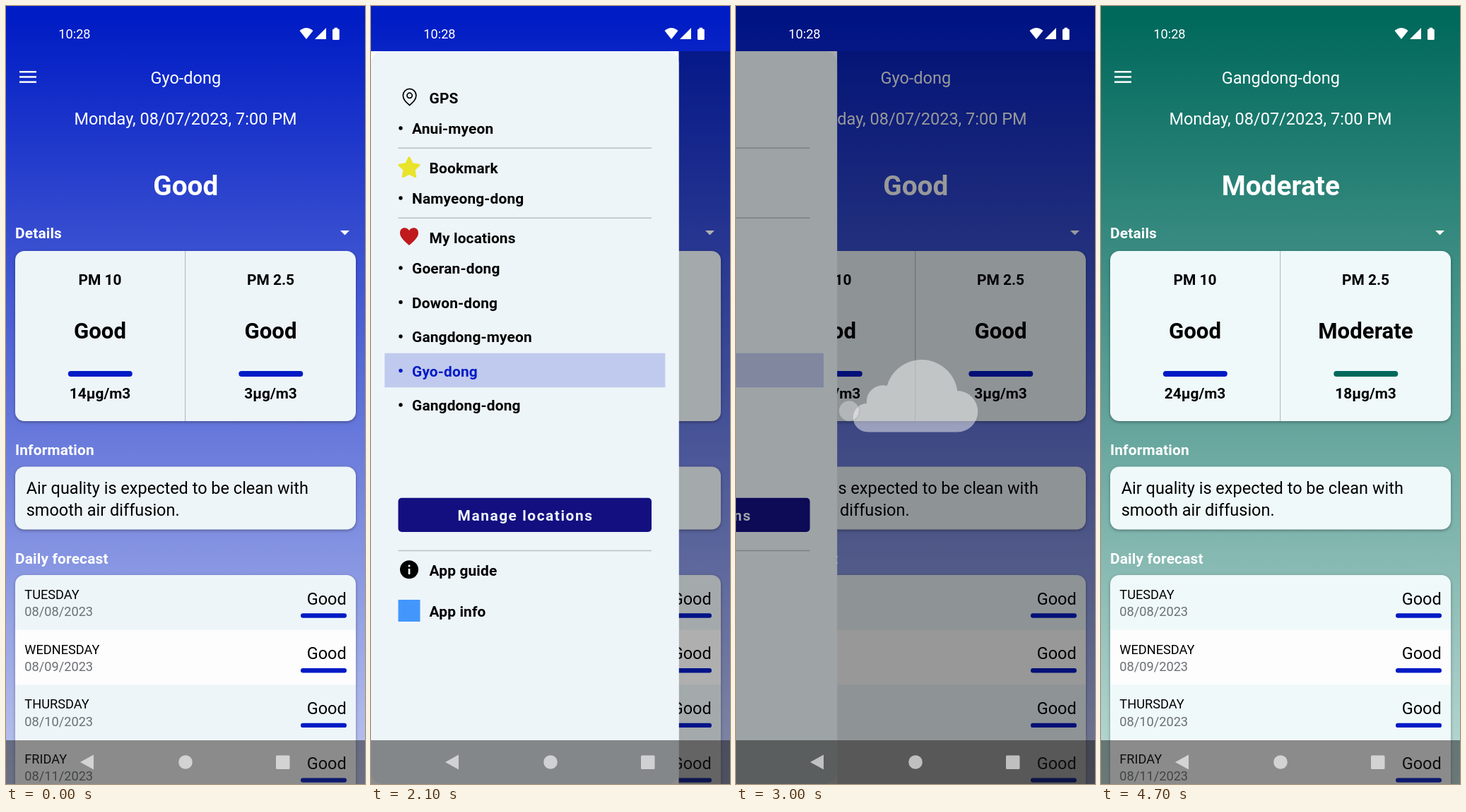
Animation, 508 px wide and 1102 px high, one loop 4800 ms. Source, as an HTML page with a canvas:

```html
<!DOCTYPE html>
<html lang="en">
<head>
<meta charset="utf-8">
<title>Air quality app</title>
<style>
  html, body { margin: 0; width: 100%; height: 100%; overflow: hidden; background: #001cc4; }
  canvas { display: block; }
</style>
</head>
<body>
<canvas id="stage" width="508" height="1102"></canvas>
<script>
const W = 508, H = 1102, LOOP = 4800, STEP = 100;
const STATUS_H = 64, NAV_Y = 1040, DRAWER_W = 435.5;
const BLUE = '#001bc5', TEAL = '#00695c';
const ctx = document.getElementById('stage').getContext('2d');

const PLACES = {
  gyo: {
    name: 'Gyo-dong', level: 'Good', top: '#001cc4', bottom: '#bec7ee', card: '#edf5f9',
    pm: [['PM 10', 'Good', BLUE, '14µg/m3'], ['PM 2.5', 'Good', BLUE, '3µg/m3']]
  },
  gangdong: {
    name: 'Gangdong-dong', level: 'Moderate', top: TEAL, bottom: '#bddad5', card: '#eff9f9',
    pm: [['PM 10', 'Good', BLUE, '24µg/m3'], ['PM 2.5', 'Moderate', TEAL, '18µg/m3']]
  }
};
const DAYS = ['TUESDAY', 'WEDNESDAY', 'THURSDAY', 'FRIDAY'];

const clamp = v => Math.min(1, Math.max(0, v));
const ramp = (t, from, to) => clamp((t - from) / (to - from));

// Critically damped spring from 0 to 1, snapping at rest.
function spring(ms) {
  if (ms <= 0) return 0;
  const x = ms * 0.0231;
  const v = 1 - (1 + x) * Math.exp(-x);
  return v > 0.985 ? 1 : v;
}

function text(str, x, y, size, { color = '#000', bold = false, align = 'left', spacing = 0 } = {}) {
  ctx.font = `${bold ? 700 : 400} ${size}px Roboto, sans-serif`;
  ctx.fillStyle = color;
  ctx.textAlign = align;
  ctx.letterSpacing = spacing + 'px';
  ctx.fillText(str, x, y);
}

function rect(x, y, w, h, color, radius = 0) {
  ctx.fillStyle = color;
  ctx.beginPath();
  ctx.roundRect(x, y, w, h, radius);
  ctx.fill();
}

function circle(x, y, r, color) {
  ctx.fillStyle = color;
  ctx.beginPath();
  ctx.arc(x, y, r, 0, 7);
  ctx.fill();
}

function shape(d, color) {
  ctx.fillStyle = color;
  ctx.fill(new Path2D(d));
}

function card(y, h, color) {
  ctx.save();
  ctx.shadowColor = 'rgba(0,0,0,.35)';
  ctx.shadowBlur = 4;
  ctx.shadowOffsetY = 1.5;
  rect(13, y, 482, h, color, 13);
  ctx.restore();
}

const heading = (str, y) => text(str, 13, y, 20.9, { color: '#fff', bold: true, spacing: 0.15 });

function drawHome(place) {
  const sky = ctx.createLinearGradient(0, 0, 0, H);
  sky.addColorStop(0.015, place.top);
  sky.addColorStop(1, place.bottom);
  rect(0, 0, W, H, sky);

  for (const y of [92, 99.2, 106.4]) rect(19, y, 24, 2.5, '#fff');
  const white = { color: '#fff', align: 'center' };
  text(place.name, 254.3, 109.5, 23.5, white);
  text('Monday, 08/07/2023, 7:00 PM', 254, 168, 23.5, white);
  text(place.level, 254.3, 268, 38.8, { ...white, bold: true });

  heading('Details', 329);
  shape('M473 318h13l-6.5 6.5z', '#fff');
  card(347, 241, place.card);
  rect(253, 347, 1.2, 241, '#b9bec1');
  place.pm.forEach(([label, level, color, amount], i) => {
    const x = 133 + i * 241.5, centered = { bold: true, align: 'center' };
    text(label, x, 394.5, 20.9, centered);
    text(level, x, 471, 31.2, centered);
    rect(x - 45.2, 517, 91, 8, color, 4);
    text(amount, x, 556, 20.9, centered);
  });

  heading('Information', 636);
  card(652.5, 89, place.card);
  text('Air quality is expected to be clean with', 28.7, 690.5, 23.5);
  text('smooth air diffusion.', 28.7, 721.5, 23.5);

  heading('Daily forecast', 790);
  card(806, 330, place.card);
  DAYS.forEach((day, i) => {
    const y = 806 + i * 77.7;
    if (i % 2) rect(13, y, 482, 77.7, '#fdfdfe');
    text(day, 26.3, y + 34, 18.2);
    text(`08/${String(8 + i).padStart(2, '0')}/2023`, 26.3, y + 58.3, 18.2, { color: '#6b7074' });
    text('Good', 481.7, y + 41.5, 23.5, { align: 'right' });
    rect(417, y + 54.3, 65, 6.4, BLUE, 3.2);
  });
}

function drawStar(cx, cy, r) {
  ctx.beginPath();
  for (let i = 0; i < 10; i++) {
    const a = i * Math.PI / 5 - Math.PI / 2, d = i % 2 ? r * 0.5 : r;
    ctx.lineTo(cx + d * Math.cos(a), cy + d * Math.sin(a));
  }
  ctx.closePath();
  ctx.fillStyle = ctx.strokeStyle = '#e9e32b';
  ctx.lineWidth = 3;
  ctx.lineJoin = 'round';
  ctx.fill();
  ctx.stroke();
}

function drawPin() {
  ctx.strokeStyle = '#000';
  ctx.lineWidth = 1.7;
  ctx.stroke(new Path2D('M54.6 140.5C50 136.500 45.300 132.500 45.300 126.700A9.300 9.300 0 0 1 63.900 126.700C63.900 132.500 59.200 136.500 54.600 140.500Z'));
  ctx.beginPath();
  ctx.arc(54.6, 126.8, 3.6, 0, 7);
  ctx.stroke();
}

function drawDrawer(open) {
  rect(0, STATUS_H, W, H - STATUS_H, `rgba(0,0,0,${0.31 * open})`);
  ctx.save();
  ctx.translate(DRAWER_W * (open - 1), 0);
  rect(0, STATUS_H, DRAWER_W, H - STATUS_H, '#fff');
  rect(0, STATUS_H, DRAWER_W, H - STATUS_H, '#edf5f9', 17);

  const label = (str, x, y, color) => text(str, x, y, 20.9, { bold: true, spacing: 0.15, color });
  const title = (str, y) => label(str, 82.5, y);
  const item = (str, y, color = '#000') => {
    circle(42, y - 8, 2.7, color);
    label(str, 58, y, color);
  };
  for (const y of [200.5, 299.5, 770.8]) rect(38.5, y, 358.5, 1.4, '#b9bfc2');

  drawPin();
  title('GPS', 137.5);
  item('Anui-myeon', 181);
  drawStar(54, 229.7, 14.8);
  title('Bookmark', 236.5);
  item('Namyeong-dong', 280);
  shape('M54 339C45 331 41 327 41 321.500C41 313.500 50 312 54 318C58 312 67 313.500 67 321.500C67 327 63 331 54 339Z', '#c01a1c');
  title('My locations', 335.5);
  rect(19.3, 491.700, 397, 48.5, '#c0caee');
  ['Goeran-dong', 'Dowon-dong', 'Gangdong-myeon', 'Gyo-dong', 'Gangdong-dong'].forEach(
    (name, i) => item(name, 379 + i * 48.5, i === 3 ? BLUE : '#000'));

  rect(38.5, 696.7, 358.5, 48.3, '#130f80', 5);
  text('Manage locations', 218.5, 729, 20.9, { color: '#edf5f9', bold: true, align: 'center', spacing: 1.55 });

  circle(54, 798.3, 13, '#000');
  rect(52.7, 797, 2.7, 8, '#edf5f9');
  rect(52.7, 791.7, 2.7, 2.7, '#edf5f9');
  title('App guide', 807);
  rect(38.5, 841, 31, 31, '#4397fc');
  title('App info', 865);
  ctx.restore();
}

function drawCloud(alpha) {
  ctx.save();
  ctx.globalAlpha = alpha;
  const cloud = new Path2D();
  for (const [x, y, r] of [[186, 583, 20.3], [208, 560.5, 23.3], [262.7, 552, 51], [313, 574.3, 29.2]]) {
    cloud.moveTo(x + r, y);
    cloud.arc(x, y, r, 0, 2 * Math.PI);
  }
  cloud.rect(186, 565, 127, 38.5);
  ctx.fillStyle = '#f7f7f7';
  ctx.fill(cloud);
  ctx.restore();
}

function drawTouch(x, y, alpha) {
  if (!alpha) return;
  ctx.save();
  ctx.globalAlpha = alpha;
  circle(x, y, 14.5, 'rgba(255,255,255,.65)');
  ctx.strokeStyle = 'rgba(130,130,150,.5)';
  ctx.lineWidth = 1.6;
  ctx.stroke();
  ctx.restore();
}

function drawSystemBars() {
  text('10:28', 74.3, 46.3, 18.2, { color: '#fff' });
  shape('M415.500 35Q425 27 434.500 35L425 47Z', '#fff');
  shape('M437 47L453 31V47Z', '#fff');
  rect(462, 32.5, 9.8, 15.5, '#fff', 1.5);
  rect(464.7, 30.7, 4.4, 3, '#fff');

  rect(0, NAV_Y, W, H - NAV_Y, 'rgba(27,27,27,.5)');
  const icon = 'rgba(255,255,255,.62)';
  shape('M105 1071L124 1060.500V1081.500Z', icon);
  circle(254, 1071, 9.8, icon);
  rect(382, 1061.5, 19.5, 19.5, icon, 1.5);
}

function draw(t) {
  const loaded = t >= 3400;
  const open = t < 2900 ? spring(t - 400) : 1 - spring(t - 2900);
  const loading = ramp(t, 2600, 2900) * (1 - ramp(t, 3300, 3500));
  const cloud = ramp(t, 2900, 3100) * (1 - ramp(t, 3300, 3500));

  drawHome(loaded ? PLACES.gangdong : PLACES.gyo);
  if (open > 0) drawDrawer(open);
  rect(0, 0, W, H, `rgba(0,0,0,${0.333 * loading})`);
  if (cloud > 0) drawCloud(cloud);
  drawTouch(45, 102, ramp(t, 100, 300) * (1 - 0.85 * ramp(t, 300, 500)) * (t < 600));
  drawTouch(160, 573.5, ramp(t, 2400, 2600) * (1 - ramp(t, 2900, 3100)));
  drawSystemBars();
}

function tick(now) {
  draw(Math.floor(now % LOOP / STEP) * STEP);
  requestAnimationFrame(tick);
}
requestAnimationFrame(tick);
</script>
</body>
</html>
```
